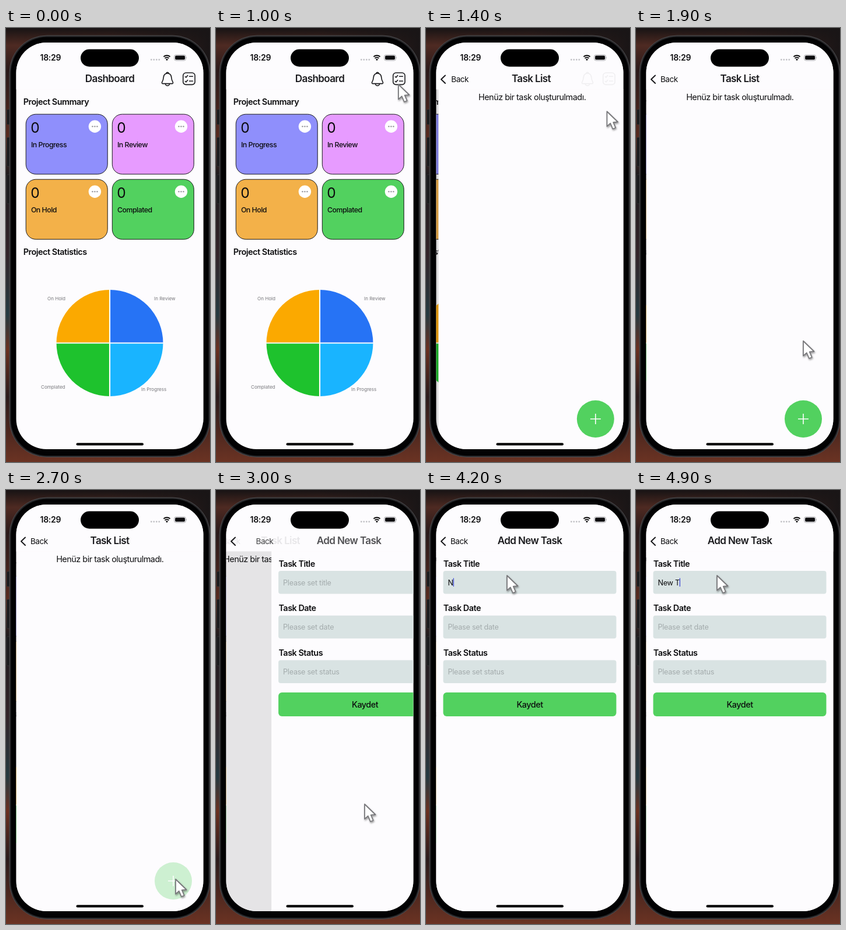
Write an HTML page that moves like this. It is 350 px wide and 746 px high and loops after 5000 ms.

```html
<!DOCTYPE html>
<html lang="en">
<head>
<meta charset="utf-8">
<title>Task app</title>
<style>
  html, body { margin: 0; width: 100%; height: 100%; overflow: hidden; background: #201817; }
  svg { display: block; font-family: Inter, "Open Sans", sans-serif; letter-spacing: -.03em; fill: #0c0c0e; }
  .line { fill: none; stroke: #1b1b1e; stroke-width: 1.6; stroke-linecap: round; stroke-linejoin: round; }
  .title { font: 600 17.1px Inter, sans-serif; letter-spacing: -.038em; text-anchor: middle; fill: #1b1b1e; }
  .head { font-size: 14.4px; font-weight: 600; }
  .back { font-size: 13.5px; letter-spacing: -.035em; }
  .card { font-size: 12.3px; font-weight: 500; }
  .num { font-size: 24.5px; font-weight: 400; }
  .pie { font-size: 8.1px; letter-spacing: 0; fill: #77777b; }
  .field { font-size: 12.6px; letter-spacing: -.02em; }
  .mid { font-size: 14.4px; text-anchor: middle; }
  .paper { fill: #fdfcfe; }
</style>
</head>
<body>
<svg width="350" height="746" viewBox="0 0 350 746">
  <defs>
    <linearGradient id="wall" x1="0" y1="0" x2="0" y2="1">
      <stop offset="0" stop-color="#171314"/>
      <stop offset=".04" stop-color="#4e2a22"/>
      <stop offset=".1" stop-color="#2a1a1a"/>
      <stop offset=".26" stop-color="#5a2c20"/>
      <stop offset=".34" stop-color="#1c1a1d"/>
      <stop offset=".52" stop-color="#332429"/>
      <stop offset=".66" stop-color="#253a40"/>
      <stop offset=".74" stop-color="#6a3020"/>
      <stop offset=".85" stop-color="#2b1b1b"/>
      <stop offset="1" stop-color="#6b3323"/>
    </linearGradient>
    <linearGradient id="shade">
      <stop offset=".5" stop-color="#191516" stop-opacity="0"/>
      <stop offset="1" stop-color="#191516"/>
    </linearGradient>
    <clipPath id="glass"><rect x="17.5" y="25" width="321" height="699" rx="52"/></clipPath>
    <filter id="soft" x="-50%" y="-50%" width="200%" height="200%">
      <feDropShadow dx="1" dy="2" stdDeviation="1.5" flood-opacity=".4"/>
    </filter>
  </defs>

  <rect width="350" height="746" fill="url(#wall)"/>
  <rect width="350" height="400" fill="url(#shade)"/>
  <g fill="#19191b" stroke="#3a3a3c" stroke-width=".6">
    <rect x="1.5" y="140" width="7" height="26" rx="1.5"/>
    <rect x="1.5" y="188" width="7" height="50" rx="1.5"/>
    <rect x="1.5" y="252" width="7" height="50" rx="1.5"/>
  </g>
  <rect x="6" y="13" width="344" height="724.5" rx="64" fill="#242426" stroke="#505053"/>
  <rect x="8.5" y="15.5" width="339" height="719.5" rx="61.5" fill="#020203"/>

  <g clip-path="url(#glass)">
    <rect class="paper" x="17" y="25" width="322" height="700"/>
    <g id="home"></g>
    <g id="list">
      <rect class="paper" x="17.5" y="105" width="321" height="620"/>
      <text class="mid" x="178.3" y="123.5">Henüz bir task oluşturulmadı.</text>
      <g id="plus">
        <circle cx="287" cy="672" r="32" fill="#52d15f"/>
        <path d="M278 672h18M287 663v18" stroke="#fff" stroke-width="1.6"/>
      </g>
      <rect class="dim" x="17.5" y="105" width="321" height="620" opacity="0"/>
    </g>
    <g id="form"></g>

    <rect class="paper" x="17" y="25" width="322" height="80.5"/>
    <g id="icons" class="line">
      <path d="M277 78c-4.6 0-6.6 3.6-6.9 7.4-.3 4.6-1.6 6-2.4 7.6-.7 1.4 0 2.6 1.4 2.6h15.8c1.4 0 2.1-1.2 1.4-2.6-.8-1.6-2.1-3-2.4-7.6-.3-3.8-2.3-7.4-6.9-7.4zM273.5 95.8a3.5 3.5 0 0 0 7 0M275 78.2a2 2 0 0 1 4 0"/>
      <rect x="303.8" y="77" width="20.4" height="20.4" rx="5"/>
      <path d="M307.5 83.5l1.4 1.4 2.8-3.4M307.5 91.5l1.4 1.4 2.8-3.4M314.5 83.3h6M314.5 91.3h6"/>
    </g>
    <text id="homeTitle" class="title" x="178" y="93">Dashboard</text>
    <text id="listTitle" class="title" x="178" y="93">Task List</text>
    <text id="formTitle" class="title" x="178" y="93">Add New Task</text>
    <path id="chevron" class="line" style="stroke-width:2" d="M33 81.5L26 88.3L33 95"/>
    <text id="listBack" class="back" x="42" y="93">Back</text>
    <text id="formBack" class="back" x="42" y="93">Back</text>
  </g>

  <text x="58.5" y="56" font-size="14" font-weight="600" style="letter-spacing:-.02em">18:29</text>
  <rect x="128" y="36.5" width="100" height="30" rx="15" fill="#000"/>
  <path d="M249.3 54.5h13.6" fill="none" stroke="#c3c3c7" stroke-width="2.8" stroke-linecap="round" stroke-dasharray="0 4.5"/>
  <path d="M270.4 49.4a8.2 8.2 0 0 1 11.2 0M272.5 52a5.2 5.2 0 0 1 7 0" fill="none" stroke="#000" stroke-width="1.9"/>
  <path d="M276 56.2l-2-2.2a3 3 0 0 1 4 0z"/>
  <rect x="288.7" y="46.2" width="19.8" height="9.8" rx="3" fill="none" stroke="#a2a2a6" stroke-width=".9"/>
  <rect x="290.1" y="47.6" width="17" height="7" rx="1.8"/>
  <path d="M309.5 49.5q1.6 1.6 0 3.2z" fill="#a2a2a6"/>
  <rect x="120.5" y="713.3" width="115.5" height="4.2" rx="2.1" fill="#000"/>
  <path id="arrow" d="M0 0V25.5L5.8 20.3 10 30 14.8 28 10.8 18.6 18.6 18Z" fill="#fff" stroke="#77777a" stroke-width="1.8" stroke-linejoin="round" filter="url(#soft)"/>
</svg>

<script>
const WIDTH = 321, LOOP = 5000;
const el = {};
document.querySelectorAll('[id]').forEach(e => el[e.id] = e);

const text = (cls, x, y, s) => `<text class="${cls}" x="${x}" y="${y}">${s}</text>`;

const card = (x, y, color, name) => `
  <rect x="${x}" y="${y}" width="140" height="103" rx="17" fill="${color}" stroke="#17171a"/>
  ${text('num', x + 8, y + 32, 0)}${text('card', x + 8.7, y + 57, name)}
  <circle cx="${x + 118.2}" cy="${y + 21}" r="10.7" fill="#fff"/>
  ${[-4, 0, 4].map(d => `<circle cx="${x + 118.2 + d}" cy="${y + 21}" r="1.3" fill="#a0a0a5"/>`).join('')}`;

const slice = (sx, sy, color) => `
  <path d="M178 541.5h${91.5 * sx}A91.5 91.5 0 0 ${sx * sy > 0 ? 1 : 0} 178 ${541.5 + 91.5 * sy}z" fill="${color}"/>`;

el.home.innerHTML =
  text('head', 29.8, 132, 'Project Summary') +
  card(34.2, 148.2, '#8f8ffc', 'In Progress') + card(182.3, 148.2, '#e79bff', 'In Review') +
  card(34.2, 260.2, '#f3b149', 'On Hold') + card(182.3, 260.2, '#52d15f', 'Complated') +
  text('head', 29.8, 390, 'Project Statistics') +
  slice(1, -1, '#2673f5') + slice(1, 1, '#19b4ff') + slice(-1, 1, '#1ec22d') + slice(-1, -1, '#fba900') +
  '<path d="M178 449v185M86 541.5h184" stroke="#fdfcfe" stroke-width="2.2"/>' +
  text('pie', 71, 468, 'On Hold') + text('pie', 254, 468, 'In Review') +
  text('pie', 60, 620, 'Complated') + text('pie', 232, 624, 'In Progress') +
  '<rect class="dim" x="17.5" y="105" width="321" height="620" opacity="0"/>';

const field = (i, name, hint) => {
  const y = 139 + 76.8 * i;
  return text('head', 29.8, y - 7.5, name) +
    `<rect x="29.5" y="${y}" width="297" height="39.5" rx="4" fill="#d9e3e3"/>` +
    `<text class="field" x="37.5" y="${y + 24.5}" fill="#a3abac">${hint}</text>`;
};

el.form.innerHTML =
  '<rect class="paper" x="17.5" y="105" width="321" height="620"/>' +
  field(0, 'Task Title', 'Please set title') +
  field(1, 'Task Date', 'Please set date') +
  field(2, 'Task Status', 'Please set status') +
  '<rect x="29.5" y="348" width="297" height="41" rx="6" fill="#52d15f"/>' +
  '<text class="mid" x="178" y="374" font-weight="500">Kaydet</text>' +
  '<rect id="caret" y="151.5" width="1.4" height="14.5" fill="#4a55d8"/>';
const input = el.form.querySelector('.field');
const caret = document.getElementById('caret');

// Critically damped spring of a page push
const push = (t, start) => {
  const x = Math.max(0, t - start) * .01826;
  return 1 - (1 + x) * Math.exp(-x);
};

// Linear interpolation through rows of [time, ...values]
const track = (t, rows) => {
  const i = rows.findIndex(r => r[0] > t);
  if (i < 0) return rows.at(-1).slice(1);
  if (!i) return rows[0].slice(1);
  const a = rows[i - 1], b = rows[i], k = (t - a[0]) / (b[0] - a[0]);
  return a.slice(1).map((v, j) => v + (b[j + 1] - v) * k);
};

const place = (e, x, opacity = 1) => {
  e.setAttribute('transform', `translate(${x.toFixed(2)} 0)`);
  e.setAttribute('opacity', Math.max(0, opacity).toFixed(3));
};

const ARROW = [
  [500, 352, 250], [700, 330, 150], [900, 313, 97], [1300, 313, 97],
  [1500, 308, 190], [1700, 294, 400], [1900, 287, 538], [2200, 291, 669],
  [2800, 291, 669], [3000, 255, 540], [3200, 180, 270], [3400, 139, 144],
  [3800, 139, 144], [4000, 139, 147]
];
const PRESS = [[2500, 1], [2700, .28], [2800, .2], [2950, 1]];

function draw(t) {
  const p = push(t, 1048), q = push(t, 2850);

  place(el.home, -.3 * WIDTH * p);
  place(el.list, WIDTH * (1 - p) - .3 * WIDTH * q);
  place(el.form, WIDTH * (1 - q));
  el.home.querySelector('.dim').setAttribute('opacity', .13 * p);
  el.list.querySelector('.dim').setAttribute('opacity', .13 * q);

  place(el.homeTitle, -89 * p, 1 - 1.2 * p);
  place(el.listTitle, 207 * (1 - p) - 89 * q, p * (1 - 1.2 * q));
  place(el.formTitle, 207 * (1 - q), q);
  place(el.listBack, 110 * (1 - p) - 40 * q, p * (1 - 1.2 * q));
  place(el.formBack, 110 * (1 - q), q);
  place(el.chevron, 0, Math.sqrt(p));
  place(el.icons, 0, (1 - p) ** .65);
  el.plus.setAttribute('opacity', track(t, PRESS)[0]);

  const typed = 'New T'.slice(0, Math.max(0, Math.floor((t - 3900) / 200)));
  input.textContent = typed || 'Please set title';
  input.setAttribute('fill', typed ? '#0c0c0e' : '#a3abac');
  const end = typed ? input.getComputedTextLength() : 0;
  caret.setAttribute('x', 37.3 + end);
  caret.setAttribute('opacity', t >= 3700 ? 1 : 0);

  const [x, y] = track(t, ARROW);
  el.arrow.setAttribute('transform', `translate(${x} ${y})`);
  el.arrow.setAttribute('opacity', t >= 500 ? 1 : 0);
}

const begin = performance.now();
function tick() {
  const t = Math.max(0, performance.now() - begin) % LOOP;
  draw(Math.floor(t / 100) * 100);
  requestAnimationFrame(tick);
}
tick();
</script>
</body>
</html>
```
